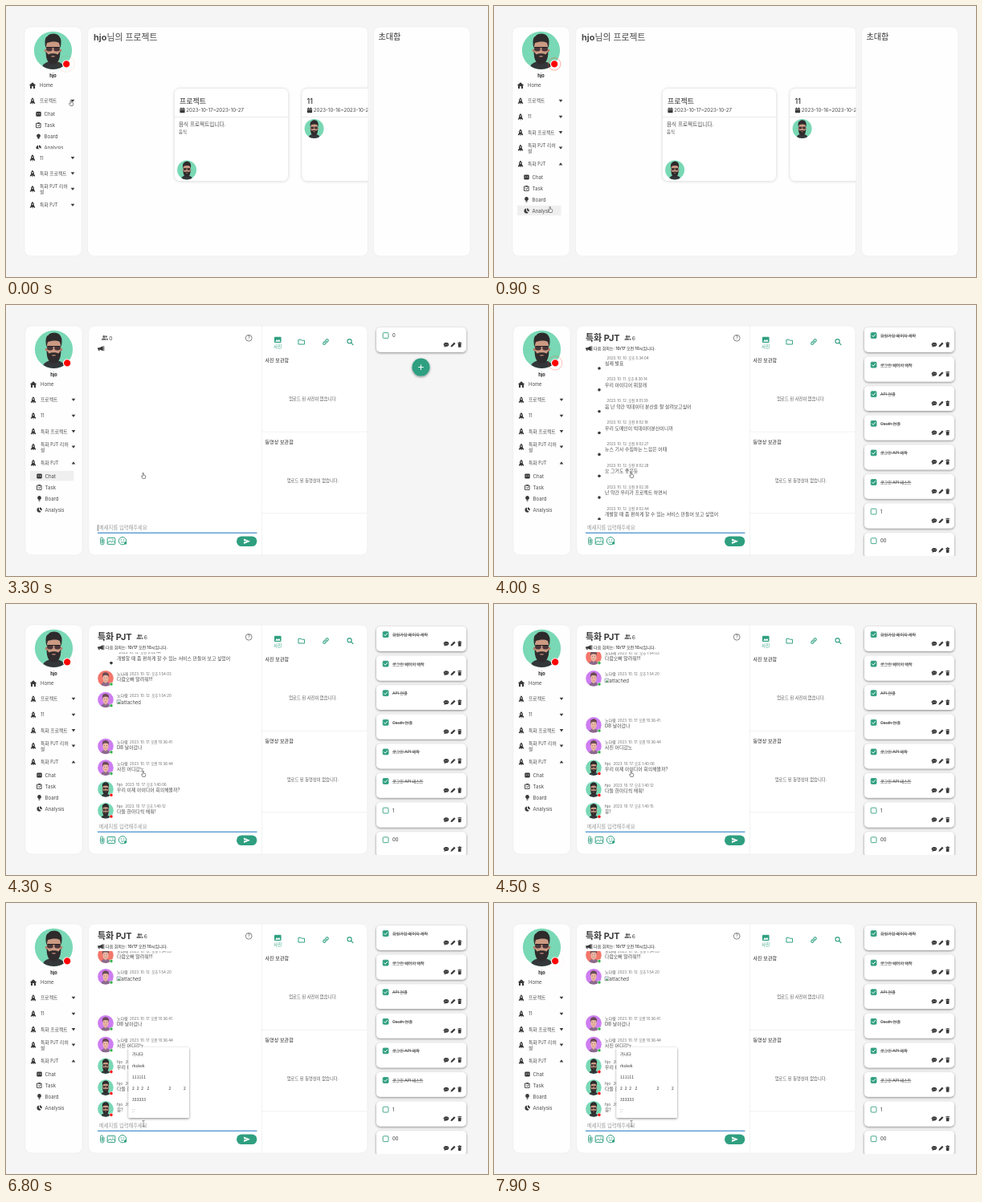
An HTML page for the animation above (8000 ms loop, 600x338 px).

```html
<!DOCTYPE html>
<html lang="ko">
<head>
<meta charset="utf-8">
<style>
html, body { margin: 0; width: 100%; height: 100%; overflow: hidden; background: #f5f5f5; }
#stage { display: block; width: 600px; height: 338px; }
text { font-family: Inter, 'Noto Sans CJK KR', 'Noto Sans CJK', sans-serif; white-space: pre; }
.cjk text { font-family: 'Noto Sans CJK KR', 'Noto Sans CJK', sans-serif; }
</style>
</head>
<body>
<svg id="stage" viewBox="0 0 600 338" xmlns="http://www.w3.org/2000/svg"></svg>
<script>
const LOOP = 8000, STEP = 100;
const PAGE = 2300, UNHOVER = 3500, LOADED = 3700, FACES = 4200, POPUP = 6100;
const SUB = 56, SCROLL = 221;
const TEAL = '#2f9f80', MINT = '#79d8b5', DARK = '#3a3a3a', USER = 'hjo', PEER = '노다람';

const text = (x, y, size, str, fill = '#4a4a4a', more = '') =>
  `<text x="${x}" y="${y}" font-size="${size}" fill="${fill}" ${more}>${str}</text>`;
const rect = (x, y, w, h, r, fill, more = '') =>
  `<rect x="${x}" y="${y}" width="${w}" height="${h}" rx="${r}" fill="${fill}" ${more}/>`;
const circle = (x, y, r, fill, more = '') => `<circle cx="${x}" cy="${y}" r="${r}" fill="${fill}" ${more}/>`;
const path = (d, fill = DARK, more = '') => `<path d="${d}" fill="${fill}" ${more}/>`;
const line = (d, color, w = 1) =>
  path(d, 'none', `stroke="${color}" stroke-width="${w}" stroke-linecap="round" stroke-linejoin="round"`);
const at = (x, y, body, scale = 1) => `<g transform="translate(${x} ${y}) scale(${scale})">${body}</g>`;
const group = (id, body, more = '') => `<g id="${id}" ${more}>${body}</g>`;
const BOLD = 'font-weight="700"', MEDIUM = 'font-weight="500"', MID = 'text-anchor="middle"';

const icon = {
  home: path('M0-4.2L4.5-.2H3.2V3.8H1V.8H-1V3.8H-3.2V-.2H-4.5Z'),
  rocket: path('M0-4.6C2-3 2.4-1 2.1 1L3.4 2.6V4.3L1.4 3.2H-1.4L-3.4 4.3V2.6L-2.1 1C-2.4-1-2-3 0-4.6Z') +
    circle(0, -1, .9, '#fff') + path('M-.8 3.6H.8L0 5Z'),
  chat: rect(-3.2, -3, 6.4, 6, 1.2, DARK) + circle(-1.2, -.2, .6, '#fff') + circle(1.2, -.2, .6, '#fff'),
  task: line('M-2.6-2.4H2.6V3H-2.6ZM-1.2.2L-.2 1.3L1.5-.8', DARK, .9) + rect(-1.3, -3.4, 2.6, 1.6, .4, DARK),
  board: path('M0-3.3A2.4 2.4 0 0 1 1.2 1.2V2.2H-1.2V1.2A2.4 2.4 0 0 1 0-3.3Z') + rect(-.9, 2.6, 1.8, .8, .3, DARK),
  analysis: path('M-.4-2.9V.4L2.2 2.4A3.1 3.1 0 1 1-.4-2.9Z') + path('M.5-3.1A3.1 3.1 0 0 1 3.1 1L.5-.5Z'),
  calendar: rect(-3.1, -2.6, 6.2, 5.8, .6, DARK) + rect(-2, -3.4, 1, 1.6, 0, DARK) +
    rect(1, -3.4, 1, 1.6, 0, DARK) + rect(-3.1, -1.2, 6.2, .5, 0, '#fff'),
  people: circle(-1.2, -1.7, 1.6, '#666') + path('M-4.2 3V1.9C-4 .2 1.6.2 1.8 1.9V3Z', '#666') +
    circle(1.8, -1.7, 1.3, '#666') + path('M2.4 3V1.8L2 .6C3.5.7 4.3 1.2 4.3 2V3Z', '#666'),
  horn: path('M-4-1H-2L2.6-3V3L-2 1.2L-1.4 3H-2.8L-3.2 1.2H-4Z') + rect(3.2, -3, .9, 6, .3, DARK),
  photo: rect(-4.3, -3.6, 8.6, 7.2, .9, TEAL) + path('M-3.2 2.4L-1.2-.3L.2 1.2L1.6-.6L3.4 2.4Z', '#fff'),
  folder: line('M-3.6-2.8H-.8L.2-1.8H3.6V3H-3.6Z', TEAL),
  link: '<g transform="rotate(-45)">' +
    line('M-.6-1.5H-2.6A1.5 1.5 0 0 0-2.6 1.5H-.6M.6-1.5H2.6A1.5 1.5 0 0 1 2.6 1.5H.6M-1.6 0H1.6', TEAL) + '</g>',
  search: circle(-.8, -.8, 2.6, 'none', `stroke="${TEAL}" stroke-width="1.1"`) + line('M1.2 1.2L3.6 3.6', TEAL, 1.2),
  clip: line('M2.2-2V2.4A2.1 2.1 0 0 1-2.2 2.4V-3A1.5 1.5 0 0 1 .9-3V2A.6.6 0 0 1-.6 2V-2', TEAL, .9),
  picture: rect(-4.8, -4, 9.6, 8, .8, '#fff', `stroke="${TEAL}"`) + line('M-4.5 2.6L-1.6-.4L.4 1.6L2.4-.2L4.5 2', TEAL) +
    circle(2, -1.8, .7, TEAL),
  smile: circle(0, 0, 4.7, '#fff', `stroke="${TEAL}"`) + circle(-1.7, -1.2, .7, TEAL) + circle(1.7, -1.2, .7, TEAL) +
    line('M-1.6 1.6Q0 2.8 1.4 1.5', TEAL, .9) + circle(3.6, 2.8, 1.7, TEAL),
  bubble: path('M0-2.8C4.4-2.8 4.4 2.3 0 2.3L-2.8 3L-2.2 1.5C-4.4-.2-3-2.8 0-2.8Z') +
    [-1.4, 0, 1.4].map(x => circle(x, -.3, .4, '#fff')).join(''),
  pencil: path('M-3 3L-2.5 1L1.4-2.9L3-1.3L-1 2.6Z'),
  trash: rect(-2.4, -2.8, 4.8, 1, .3, DARK) + rect(-.9, -3.4, 1.8, 1, .2, DARK) + path('M-2-1.4H2L1.7 3.2H-1.7Z'),
  down: path('M-2.3-1.5H2.3L0 1.8Z'),
  up: path('M-2.3 1.5H2.3L0-1.8Z'),
  hand: path('M-.9-3.4Q-.2-4.2.4-3.3V-.8L2.4-.2Q3-.1 2.8.9L2.2 3.4H-1L-2.5.9Q-2.4 0-1.3.5L-.9.8Z', '#fff',
    'stroke="#555" stroke-width=".7"'),
  beam: line('M-1.2-3.4H1.2M0-3.4V3.4M-1.2 3.4H1.2', '#777', .7)
};

const bearded =
  path('M-15 25C-14 17 -9 15 -5 14H5C9 15 14 17 15 25Z', '#33373a') +
  circle(-9, 0, 2, '#b77f68') + circle(9, 0, 2, '#b77f68') +
  path('M-8.5-12H8.5V4C8.5 12 4 15 0 15S-8.5 12-8.5 4Z', '#cc9a83') +
  path('M-9.3-3C-11-12-10-17-7-18C-4-22.5 6-22.5 8.5-17C11-14 10.4-8 9.3-3L7.6-9.5C3-12-3-11-7.6-9.5Z', '#2e2b2c') +
  path('M-9 1L-6 5.2C-3 3.4 3 3.4 6 5.2L9 1C9.4 11 6 17.5 0 17.5S-9.4 11-9 1Z', '#302c2d') +
  path('M-3 7.4Q0 5.9 3 7.4Q0 9.2-3 7.4Z', '#c08474') +
  rect(-8.6, -4.6, 7.8, 5.6, 2.4, '#4a3538') + rect(.8, -4.6, 7.8, 5.6, 2.4, '#4a3538') + rect(-8.6, -4.6, 17.2, 1.2, .5, '#262022');

const shaven =
  path('M-15 25C-14 16 -9 13 -5 12H5C9 13 14 16 15 25Z', '#8a6a8c') + rect(-3.5, 7, 7, 8, 2, '#d99f8d') +
  path('M-8.5-10H8.5V2C8.5 8 4 12 0 12S-8.5 8-8.5 2Z', '#eab8a4') +
  path('M-9.3-2C-11-11-9-17-4-17.5C3-20 9-16 9.8-11L9.3-2L7.4-8C3-10-3-10-7.4-8Z', '#6b4b55') +
  circle(-3.6, -2, 1.2, '#4d373c') + circle(3.6, -2, 1.2, '#4d373c') + line('M-2.6 6Q0 7.6 2.6 6', '#a5655f', 1.2);

const avatar = (x, y, r, bg, figure = bearded) =>
  at(x, y, circle(0, 0, 24, bg) + `<g clip-path="url(#round)">${figure}</g>`, r / 24);

const MENU = ['프로젝트', '11', '특화 프로젝트', '특화 PJT 리허|설', '특화 PJT'];
const MENU_Y = [118.3, 138.2, 157.6, 177, 197];
const ITEMS = ['Chat', 'Task', 'Board', 'Analysis'];

const subMenu = id => `<svg id="${id}" x="23" width="72" height="0" overflow="hidden">` +
  rect(6, 1, 54.5, 12.5, 0, '#efefef', 'class="hover"') +
  ITEMS.map((s, i) => at(17.5, 7.6 + 14 * i, icon[s.toLowerCase()]) + text(24.5, 9.8 + 14 * i, 6.1, s)).join('') + '</svg>';

const menuRow = (label, i) => {
  const lines = label.split('|');
  const top = lines.length > 1 ? -1.4 : 2.1;
  return group('row' + i, at(33, 0, icon.rocket, .9) +
    lines.map((s, k) => text(42, top + 7.6 * k, 5.8, s)).join('') +
    `<g class="down">${at(83, 0, icon.down)}</g><g class="up">${at(83, 0, icon.up)}</g>`);
};

const sidebar = group('side',
  rect(22.8, 26, 71.4, 286, 8, '#fefefe', 'stroke="#eaeaea" stroke-width=".6"') +
  avatar(58.5, 55.4, 23.6, MINT) +
  circle(75.2, 72.4, 4.5, 'none', 'id="ripple" stroke="#ff3a1c"') +
  circle(75.2, 72.4, 4.7, '#f00', 'stroke="#fff" stroke-width="1.1"') +
  text(58.5, 89, 5.6, USER, '#222', BOLD + ' ' + MID) +
  at(33, 99.3, icon.home, .95) + text(42, 101.4, 5.9, 'Home') +
  MENU.map(menuRow).join('') + subMenu('sub0') + subMenu('sub4'));

function projectCard(x, title, dates, body, faceY) {
  return rect(x, 102.5, 142, 116, 7, '#fff', 'stroke="#e4e4e4" stroke-width=".7" filter="url(#soft)"') +
    text(x + 6.5, 122, 9, title, '#333', MEDIUM) + at(x + 10, 130, icon.calendar) +
    text(x + 14.8, 132.2, 6.2, dates) + rect(x, 138, 142, .7, 0, '#e2e2e2') + body + avatar(x + 15.6, faceY, 12, MINT);
}

const home = group('home',
  rect(101.5, 26, 349, 286, 8, '#fefefe', 'stroke="#eaeaea" stroke-width=".6"') +
  rect(457.5, 26, 120.5, 286, 8, '#fefefe', 'stroke="#eaeaea" stroke-width=".6"') +
  text(109, 43, 10.9, `<tspan font-weight="700">${USER}</tspan>님의 프로젝트`) +
  text(463.5, 42.3, 10.1, '초대함', '#333', MEDIUM) +
  '<g clip-path="url(#mainClip)">' +
  projectCard(209.5, '프로젝트', '2023-10-17~2023-10-27',
    text(215, 149.5, 6.6, '음식 프로젝트입니다.') + text(215, 158.7, 5.4, '음식'), 204.5) +
  projectCard(368, '11', '2023-10-16~2023-10-20', '', 153) + '</g>');

const EARLY = [
  ['10. 오후 5:34:04', '실제 발표'], ['11. 오후 8:30:14', '우리 아이디어 뭐할래'],
  ['12. 오전 9:01:39', '음 난 약간 빅데이터 분산을 잘 살려보고싶어'], ['12. 오전 9:02:18', '우리 도메인이 빅데이터분산이니까'],
  ['12. 오전 9:02:27', '뉴스 기사 수집하는 느낌은 어때'], ['12. 오전 9:02:28', '오 그거도 좋은듯'],
  ['12. 오전 9:02:30', '난 약간 우리가 프로젝트 하면서'],
  ['12. 오전 9:02:44', '개발할 때 좀 편하게 할 수 있는 서비스 만들어 보고 싶었어']
];
const RED = '#f2776b', VIOLET = '#cd7df0', OK = '#35b34a';
const LATE = [
  [59.8, '노나래', RED, '12. 오후 1:54:03', '다람오빠 알려줘!!!'], [86.5, PEER, VIOLET, '12. 오후 1:54:20', ''],
  [144.5, PEER, VIOLET, '17. 오전 10:36:41', 'DB 날아갔나'], [171.2, PEER, VIOLET, '17. 오전 10:36:44', '사진 어디갔노'],
  [198, USER, MINT, '17. 오후 1:40:06', '우리 이제 아이디어 회의해볼까?'],
  [224.8, USER, MINT, '17. 오후 1:40:12', '다들 한마디씩 해줘!'], [251.6, USER, MINT, '17. 오후 1:40:15', '응!']
];
const early = EARLY.map(([when, s], i) => {
  const y = 66 + 26.85 * i;
  return text(140.5, y + 1.6, 4.35, '2023. 10. ' + when, '#666') + text(138, y + 9, 5.9, s) + circle(131, y + 13, 1.8, DARK);
}).join('');
const broken = rect(138, 5.4, 5, 5, .3, '#dfe9f5', 'stroke="#777" stroke-width=".5"') +
  path('M138.5 10L140.6 7.6L142.6 10Z', '#4a9b4e') + text(143.6, 10.6, 5.9, 'attached');
const late = LATE.map(([y, name, bg, when, s]) => {
  const mine = name === USER;
  return at(0, y + SCROLL,
    `<g class="face">${avatar(124, 5.3, 9.8, bg, mine ? bearded : shaven)}</g>` +
    circle(131, 12.6, 2, mine ? '#f00' : OK, 'stroke="#fff" stroke-width=".5"') +
    text(138, 1.8, 5, name, '#555') + text(mine ? 148.5 : 154, 1.7, 4.4, '2023. 10. ' + when, '#666') +
    (s ? text(138, 8.8, 5.9, s) : broken));
}).join('');

const TODO = ['회원가입 페이지 제작', '로그인 페이지 제작', 'API 연결', 'Oauth 연결', '로그인 API 제작', '로그인 API 테스트', '1', '00'];
const todo = (label, i, done) => at(0, 36.6 * i,
  rect(461, 28, 112, 30.8, 5, '#fff', 'filter="url(#drop)"') +
  rect(469.2, 34.6, 6.8, 6.8, 1, done ? TEAL : '#fff', `stroke="${TEAL}" stroke-width=".9"`) +
  (done ? line('M470.7 38.2L472.1 39.6L474.7 36.6', '#fff') : '') +
  text(481, 40, done ? 5 : 5.9, label, '#333', done ? 'text-decoration="line-through"' : '') +
  at(548, 49.5, icon.bubble) + at(556.5, 49.5, icon.pencil) + at(564.7, 49.5, icon.trash));

const archive = (y, name, label) => text(322.5, y, 6.1, name + ' 보관함', '#222', MEDIUM) +
  text(382, y + 48, 5.3, `업로드 된 ${label} 없습니다.`, '#555', MID);

const chat = group('chat',
  rect(102.8, 26, 347, 286, 8, '#fff', 'stroke="#ebebeb" stroke-width=".6"') +
  rect(318.3, 26, .7, 286, 0, '#ececec') + [157.8, 259.5].map(y => rect(318.5, y, 131, .7, 0, '#ececec')).join('') +
  group('members', at(123, 41, icon.people, .95) + group('empty', text(128.2, 44, 6.8, '0')) + group('six', text(128.2, 44, 6.8, '6'))) +
  group('title', text(114, 44.7, 11, '특화 PJT', DARK, BOLD) + text(124, 56.2, 5.05, '다음 회의는: 10/17 오전 10시입니다.', '#222', MEDIUM)) +
  at(118.2, 54.3, icon.horn) +
  circle(302.2, 41.2, 3.9, 'none', 'stroke="#666" stroke-width=".8"') + text(302.2, 43.4, 6, '?', '#555', MID) +
  at(338.3, 43.4, icon.photo) + text(338.3, 54.2, 5.4, '사진', TEAL, MID) +
  at(368, 46, icon.folder) + at(398, 46, icon.link) + at(428.4, 46, icon.search) +
  archive(71.4, '사진', '사진이') + archive(172.6, '동영상', '동영상이') +
  `<g clip-path="url(#logClip)">${group('log', early + late)}</g>` +
  text(116, 280.3, 6.3, '메세지를 입력해주세요', '#999') + rect(114.2, 274, .6, 8, 0, '#333', 'id="caret"') +
  rect(114, 283.6, 198.5, 1.3, 0, '#4b93cf') +
  at(119.8, 294.4, icon.clip) + at(131, 294.4, icon.picture) + at(145, 294.2, icon.smile) +
  rect(287, 288.4, 25.4, 12.6, 6.3, TEAL) + path('M296 291.5L304 294.7L296 298V295.4L300.4 294.7L296 294Z', '#fff') +
  '<g clip-path="url(#todoClip)">' +
  group('oneTodo', todo('0', 0, false) + circle(516.5, 77.6, 11, TEAL, 'filter="url(#drop)"') + line('M513.6 77.6H519.4M516.5 74.7V80.5', '#fff')) +
  group('todos', TODO.map((s, i) => todo(s, i, i < 6)).join('')) + '</g>');

const gap = n => ' '.repeat(n);
const TYPED = ['가나다', 'rkskek', '111111', ['2', '2', '2'].join(gap(2)) + gap(3) + '2' + gap(17) + '2' + gap(11) + '2', '333333', '::'];
const popup = group('popup', rect(152.5, 180, 75.5, 88, 1.5, '#fff', 'filter="url(#drop)"') +
  TYPED.map((s, i) => text(157, 190.4 + 14.1 * i, 5.1, s, '#333')).join(''), 'class="cjk"');

const clip = (id, shape) => `<clipPath id="${id}">${shape}</clipPath>`;
const shadow = (id, y, blur, a) => `<filter id="${id}" x="-20%" y="-20%" width="140%" height="150%">
  <feDropShadow dx="0" dy="${y}" stdDeviation="${blur}" flood-opacity="${a}"/></filter>`;

document.getElementById('stage').innerHTML =
  '<defs>' + clip('round', circle(0, 0, 24, '#000')) + clip('mainClip', rect(102, 26, 348.5, 286, 8, '#000')) +
  clip('logClip', rect(104, 60, 213, 208, 0, '#000')) + clip('todoClip', rect(452, 20, 148, 293, 0, '#000')) +
  shadow('soft', .5, 1.5, .13) + shadow('drop', 1.1, 1.5, .46) + '</defs>' +
  rect(0, 0, 600, 338, 0, '#f5f5f5') + home + chat + sidebar + popup +
  group('cursor', group('hand', icon.hand) + group('beam', icon.beam));

const $ = id => document.getElementById(id);
const faces = document.querySelectorAll('.face');
const show = (el, on) => el.setAttribute('display', on ? 'inline' : 'none');
const move = (el, x, y) => el.setAttribute('transform', `translate(${x} ${y})`);
const unit = v => Math.min(1, Math.max(0, v));
const smooth = v => { v = unit(v); return v * v * (3 - 2 * v); };

// time, x, y
const TRACK = [[0, 81, 121], [150, 81, 121], [400, 82, 199], [550, 82, 199], [900, 70, 254], [1100, 70, 254],
  [1700, 67, 211], [2700, 67, 211], [3200, 171, 213], [3900, 171, 212], [4700, 171, 212], [5300, 167, 274],
  [5900, 167, 274], [6200, 171, 275], [LOOP, 171, 275]];

function pointer(t) {
  const i = TRACK.findIndex(k => k[0] > t);
  const [a, b] = [TRACK[i - 1], TRACK[i]];
  const p = smooth((t - a[0]) / (b[0] - a[0]));
  return [a[1] + (b[1] - a[1]) * p, a[2] + (b[2] - a[2]) * p];
}

function drawMenu(t, y, inChat) {
  const h0 = SUB * (1 - smooth((t + 54) / 300)), h4 = SUB * smooth((t - 450) / 300);
  MENU_Y.forEach((top, i) => {
    const row = $('row' + i), open = i === 4 && t >= 450;
    move(row, 0, top + (i ? h0 : 0));
    show(row.querySelector('.up'), open);
    show(row.querySelector('.down'), !open);
  });
  [['sub0', MENU_Y[0] + 8.8, h0], ['sub4', MENU_Y[4] + 8.8 + h0, h4]].forEach(([id, top, h]) => {
    $(id).setAttribute('y', top);
    $(id).setAttribute('height', h);
    show($(id), h > 0);
  });
  const over = inChat ? (t < UNHOVER ? 0 : -1) : Math.floor((y - 3 - MENU_Y[4] - 8.8) / 14);
  const bar = $('sub4').querySelector('.hover');
  show(bar, over >= 0 && over < 4);
  bar.setAttribute('y', 1 + 14 * over);
  show($('sub0').querySelector('.hover'), false);
}

function draw(t) {
  const inChat = t >= PAGE, loaded = t >= LOADED;
  const [x, y] = pointer(t);
  show($('home'), !inChat);
  show($('chat'), inChat);
  move($('side'), inChat ? 1 : 0, 0);
  drawMenu(t, y, inChat);

  const phase = (inChat ? (t - 840) / 1200 : t / 1200 + .8) % 1;
  $('ripple').setAttribute('r', 4.5 * (.8 + 1.6 * smooth(phase)));
  $('ripple').setAttribute('opacity', 1 - smooth(phase));

  for (const id of ['title', 'six', 'log', 'todos']) show($(id), loaded);
  for (const id of ['empty', 'oneTodo', 'caret']) show($(id), !loaded);
  move($('members'), loaded ? 43.5 : 0, 0);
  faces.forEach(f => show(f, t >= FACES));
  move($('log'), 0, -SCROLL * (1 - (1 - unit((t - 4000) / 600)) ** 3));

  show($('popup'), t >= POPUP);
  move($('cursor'), x, y);
  show($('beam'), y > 268);
  show($('hand'), y <= 268);
}

const start = performance.now();
function tick() {
  const t = (performance.now() - start) % LOOP;
  draw(Math.floor(t / STEP) * STEP);
  requestAnimationFrame(tick);
}
tick();
</script>
</body>
</html>
```
